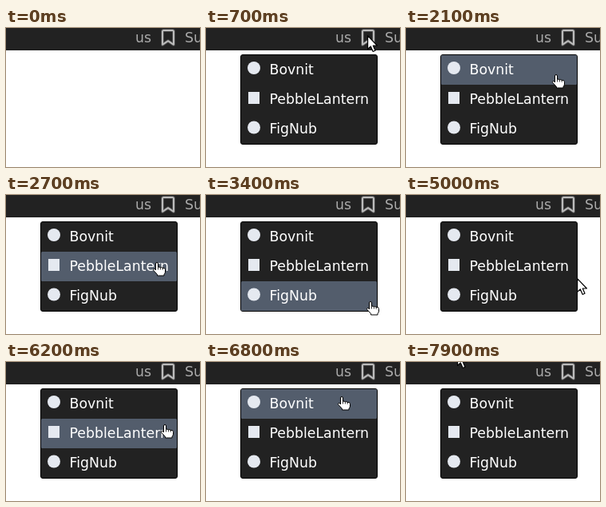
An HTML page that plays this animation: 243 by 174 pixels, repeating every 8000 ms.

```html
<!DOCTYPE html>
<html lang="en">
<head>
<meta charset="utf-8">
<title>Bookmark menu</title>
<style>
  html, body { margin: 0; width: 100%; height: 100%; overflow: hidden; background: #fff; }
  svg { display: block; width: 243px; height: 174px; }
  text { font: 17.33px "DejaVu Sans", sans-serif; }
  .bar text { fill: #aaa; }
  .menu text { fill: #fff; }
  .icon { fill: #e5e9f0; }
  .bookmark { fill: none; stroke: #bbb; stroke-width: 2; stroke-linejoin: round; }
  .halo { stroke: #888; stroke-width: 4; opacity: .4; }
  .cursor { fill: #fff; stroke: #000; stroke-linejoin: round; }
</style>
</head>
<body>
<svg viewBox="0 0 243 174">
  <defs><path id="ribbon" d="M197.5 3H208.5Q210 3 210 4.5V20.8L203 16.2L196 20.8V4.5Q196 3 197.5 3Z"/></defs>
  <g class="bar">
    <rect width="243" height="28" fill="#222"/>
    <text x="162" y="18">us</text>
    <text x="224" y="18">Su</text>
    <use href="#ribbon" class="bookmark halo"/>
    <use href="#ribbon" class="bookmark"/>
  </g>
  <g class="menu" id="menu">
    <rect x="43.5" y="33.5" width="171" height="112" rx="2.5" fill="#222" stroke="#000"/>
    <rect id="highlight" x="44" width="170" height="37" rx="1.5" fill="#535d6c"/>
    <circle class="icon" cx="60" cy="50" r="8"/>
    <rect class="icon" x="53" y="80" width="14" height="15"/>
    <circle class="icon" cx="60" cy="124.5" r="8"/>
    <text x="79.5" y="58">Bovnit</text>
    <text x="79.5" y="95">PebbleLantern</text>
    <text x="79.5" y="132">FigNub</text>
  </g>
  <!-- Both pointers have their hotspot at 0,0 -->
  <path id="arrow" class="cursor" stroke-width="1.2" d="M-.4 -.3V16.4L3.3 13L6.2 19.5L9 18.3L6.3 12H11.4Z"/>
  <g id="hand" class="cursor">
    <path d="M-1.5 10V2Q-1.5 .5 0 .5T1.5 2V6.5Q3 5.4 4.3 6.8Q6 5.9 7 7.4Q10.5 6.8 10.5 9.5V12Q10.5 14 9 15.5V17H.5V15.5L-4.1 10.5Q-5 9.1 -3.8 8.5T-1.5 10Z"/>
    <path d="M1.5 6.5V9.5M4.4 7V9.5M7.2 7.5V9.8" fill="none" stroke-width=".8"/>
  </g>
</svg>
<script>
  const LOOP = 8000, STEP = 100, MENU_OPEN = 700;
  const MENU = { left: 44, right: 215, top: 34, bottom: 145, row: 37 };

  // The pointer glides from stop to stop and rests in between.
  const origin = { x: 180, y: -22 };
  const moves = [
    { start: 200, steps: 4, x: 203, y: 10 },
    { start: 1200, steps: 5, x: 187, y: 48 },
    { start: 2000, steps: 5, x: 189, y: 76 },
    { start: 2700, steps: 4, x: 186, y: 128 },
    { start: 3200, steps: 5, x: 217, y: 135 },
    { start: 4200, steps: 3, x: 203, y: 130 },
    { start: 4800, steps: 4, x: 217, y: 100 },
    { start: 5400, steps: 5, x: 202, y: 93 },
    { start: 6100, steps: 4, x: 196, y: 62 },
    { start: 6600, steps: 3, x: 170, y: 43 },
    { start: 7200, steps: 1, x: 172, y: 36 },
    { start: 7500, steps: 5, x: 65, y: -12 }
  ];

  const $ = id => document.getElementById(id);
  const show = (el, on) => el.setAttribute('visibility', on ? 'visible' : 'hidden');
  const smooth = p => p * p * (3 - 2 * p);
  const mix = (a, b, p) => Math.round(a + (b - a) * p);

  function pointerAt(time) {
    const index = moves.findLastIndex(move => move.start <= time);
    if (index < 0) return origin;
    const from = moves[index - 1] || origin, to = moves[index];
    const step = Math.floor((time - to.start) / STEP) + 1;
    const p = smooth(Math.min(1, step / to.steps));
    return { x: mix(from.x, to.x, p), y: mix(from.y, to.y, p) };
  }

  function render(time) {
    const { x, y } = pointerAt(time);
    const open = time >= MENU_OPEN;
    const hover = open && x >= MENU.left && x < MENU.right && y >= MENU.top && y < MENU.bottom;

    show($('menu'), open);
    show($('highlight'), hover);
    show($('hand'), hover);
    show($('arrow'), !hover);
    for (const id of ['hand', 'arrow']) $(id).setAttribute('transform', `translate(${x} ${y})`);
    if (hover) {
      const row = Math.floor((y - MENU.top) / MENU.row);
      $('highlight').setAttribute('y', MENU.top + row * MENU.row);
    }
  }

  const begin = performance.now();
  function tick() {
    render((performance.now() - begin) % LOOP);
    requestAnimationFrame(tick);
  }
  tick();
</script>
</body>
</html>
```
